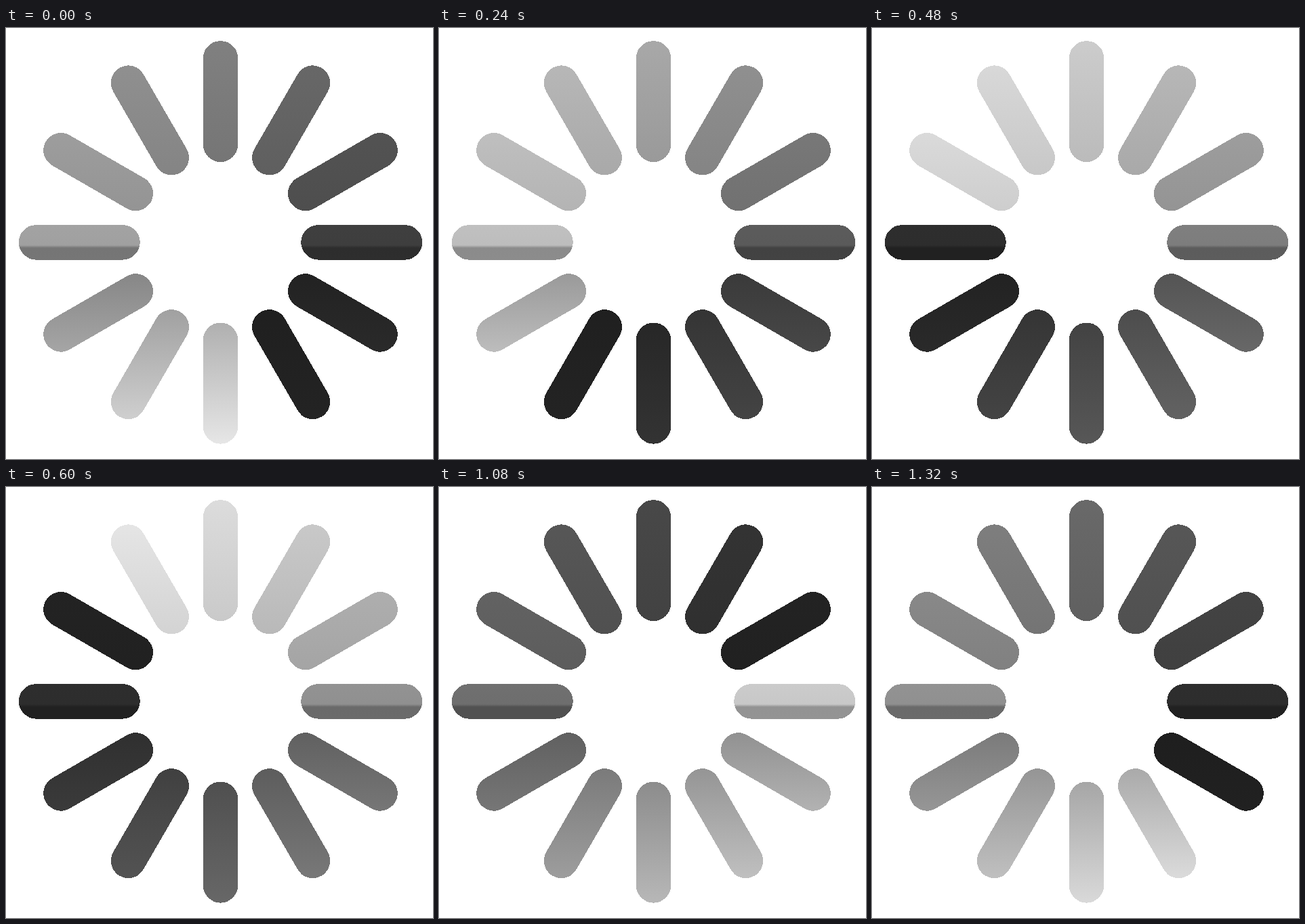
These frames come from a looping animation (630 by 637 pixels, 1.44 s). An HTML page with a canvas:

```html
<!DOCTYPE html>
<html lang="en">
<head>
<meta charset="utf-8">
<title>Spinner</title>
<style>
  html, body { margin: 0; width: 100%; height: 100%; overflow: hidden; background: #fff; }
  canvas { display: block; }
</style>
</head>
<body>
<canvas id="stage" width="630" height="637"></canvas>
<script>
const W = 630, H = 637;
const ctx = document.getElementById('stage').getContext('2d');
const COUNT = 12, STEP = 120, START = 5;
const CX = 316.5, CY = 316.75, INNER = 144.5, OUTER = 272, WIDTH = 51.25;
const TOP = 19, BOTTOM = 614;
const DARKEST = 30;

// Grey level of a bar by the number of steps since it was the head.
const GREYS = [37, 52, 72, 88, 105, 128, 146, 168, 186, 204, 220, 233];

// Glossy shading over the whole wheel: [y, brightness].
const SHADE = [[TOP, 1], [321, 0.858], [325, 0.63], [345, 0.635], [BOTTOM, 0.985]];

function shaded(grey) {
  const fill = ctx.createLinearGradient(0, TOP, 0, BOTTOM);
  for (const [y, light] of SHADE) {
    const v = Math.max(DARKEST, Math.round(grey * light));
    fill.addColorStop((y - TOP) / (BOTTOM - TOP), `rgb(${v},${v},${v})`);
  }
  return fill;
}

function drawBar(c, i, style, width) {
  const a = i * 2 * Math.PI / COUNT;
  const dx = Math.sin(a), dy = -Math.cos(a);
  c.strokeStyle = style;
  c.lineWidth = width;
  c.lineCap = 'round';
  c.beginPath();
  c.moveTo(CX + dx * INNER, CY + dy * INNER);
  c.lineTo(CX + dx * OUTER, CY + dy * OUTER);
  c.stroke();
}

// Hard-edged silhouette of all bars.
function makeMask() {
  const mask = document.createElement('canvas');
  mask.width = W;
  mask.height = H;
  const c = mask.getContext('2d');
  for (let i = 0; i < COUNT; i++) drawBar(c, i, '#000', WIDTH);
  const pixels = c.getImageData(0, 0, W, H);
  for (let p = 3; p < pixels.data.length; p += 4) {
    pixels.data[p] = pixels.data[p] > 90 ? 255 : 0;
  }
  c.putImageData(pixels, 0, 0);
  return mask;
}

const fills = GREYS.map(shaded);
const mask = makeMask();

function draw(time) {
  const head = START + Math.floor(time / STEP) % COUNT;
  ctx.globalCompositeOperation = 'source-over';
  ctx.clearRect(0, 0, W, H);
  for (let i = 0; i < COUNT; i++) {
    const age = (head - i + COUNT) % COUNT;
    // The horizontal bars hold their darkest tone for two steps.
    drawBar(ctx, i, fills[i % 6 === 3 ? Math.max(age, 1) : age], WIDTH + 4);
  }
  ctx.globalCompositeOperation = 'destination-in';
  ctx.drawImage(mask, 0, 0);
  ctx.globalCompositeOperation = 'destination-over';
  ctx.fillStyle = '#fff';
  ctx.fillRect(0, 0, W, H);
}

const begin = performance.now();
function tick() {
  draw(performance.now() - begin);
  requestAnimationFrame(tick);
}
tick();
</script>
</body>
</html>
```
